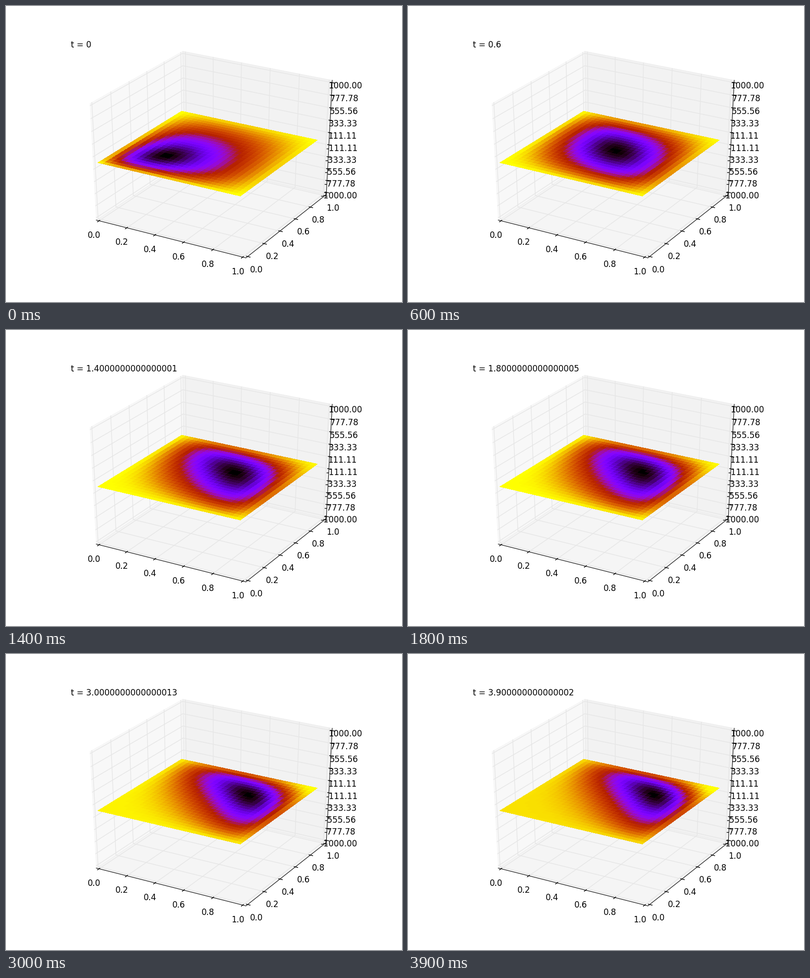
Animation of 800x600 px, one loop 4 s. Source, as a matplotlib script:

```python
import numpy as np
import matplotlib.pyplot as plt
from matplotlib.animation import FuncAnimation
from matplotlib.collections import LineCollection, PolyCollection

W, H = 800, 600
FRAMES, INTERVAL = 40, 100
NODES = 30
LO, HI = -1 / 48, 1 + 1 / 48      # panes reach a little past the unit cube
TICK_OUT, TICK_IN = 0.1 / 12, 0.2 / 12
LABEL_GAP = 0.7 / 12
BASELINE = 14.7                   # label anchor to text baseline

plt.rcParams["font.family"] = "DejaVu Sans"
plt.rcParams["font.size"] = 12
plt.rcParams["text.kerning_factor"] = 6

fig = plt.figure(figsize=(W / 100, H / 100), dpi=100, facecolor="white")
ax = fig.add_axes([0, 0, 1, 1])
ax.set_xlim(0, W)
ax.set_ylim(H, 0)
ax.axis("off")


def project(p):
    """Perspective view of the unit cube (elev 30, azim -60) in pixels."""
    q = np.asarray(p, float) - 0.5
    c, s = np.cos(np.pi / 6), 0.5
    right = q @ [c, s, 0]
    up = q @ [-s * s, s * c, c]
    depth = 10 - q @ [s * c, -c * c, s]
    x = 100 + 620 * (right / depth + 0.095) / 0.185
    y = 540 - 480 * (up / depth + 0.095) / 0.185
    return np.stack([x, y], axis=-1)


def put(axis, value, rest):
    """Point with the given axis coordinate; rest fills the other two."""
    p = list(rest)
    p.insert(axis, value)
    return p


def draw_panes():
    panes = [
        ([(LO, LO, LO), (LO, HI, LO), (LO, HI, HI), (LO, LO, HI)], 0.95),
        ([(LO, HI, LO), (HI, HI, LO), (HI, HI, HI), (LO, HI, HI)], 0.9),
        ([(LO, LO, LO), (HI, LO, LO), (HI, HI, LO), (LO, HI, LO)], 0.925),
    ]
    for corners, grey in panes:
        color = (grey, grey, grey, 0.5)
        ax.add_collection(PolyCollection([project(corners)], facecolors=[color],
                                         edgecolors=[color], linewidths=1))


def draw_axis(axis, ticks, labels, edge, back, tick_dir, sign):
    """edge: fixed coordinates of the axis line; back: of the rear corner."""
    front = [HI if b == LO else LO for b in back]
    grid = [project([put(axis, t, (front[0], back[1])),
                     put(axis, t, back),
                     put(axis, t, (back[0], front[1]))]) for t in ticks]
    ax.add_collection(LineCollection(grid, colors="0.9", linewidths=1))

    line = project([put(axis, LO, edge), put(axis, HI, edge)])
    ax.plot(*line.T, color="black", lw=0.75)

    away = [e + np.sign(e - 0.5) * LABEL_GAP for e in edge]
    for t, label in zip(ticks, labels):
        a, b = put(axis, t, edge), put(axis, t, edge)
        a[tick_dir] += sign * TICK_OUT
        b[tick_dir] -= sign * TICK_IN
        ax.plot(*project([a, b]).T, color="black", lw=1)
        x, y = project(put(axis, t, away))
        ax.text(x, y + BASELINE, label, ha="center", va="baseline")


def field(x, y, t):
    """Hump that drifts along the diagonal and turns over near (1, 1)."""
    r = t / (t + 0.65)
    peak = 0.295 + 0.445 * r
    width = 0.38 - 0.257 * r
    q = 0.6 * np.sqrt(r)
    tight = 1.7 * np.sqrt(r)

    def wall(v):
        return np.tanh(v / width) * np.tanh((1 - v) / width)

    def wall_slope(v):
        return 2 / (width * np.sinh(2 * v / width))

    # The exponent puts the maximum exactly at x = y = peak.
    slope = wall_slope(peak) - wall_slope(1 - peak)
    n = (2 * peak + 0.2) * (q / (1 - 2 * q * peak) - slope)
    s = x + y
    drift = (s + 0.2) ** n * (1 - q * s)
    return wall(x) * wall(y) * drift * np.exp(-tight * (s - 2 * peak) ** 2)


draw_panes()
fifths = np.linspace(0, 1, 6)
tenths = [f"{v:.1f}" for v in fifths]
levels = np.linspace(0, 1, 10)
heights = [f"{v:.2f}" for v in np.linspace(-1000, 1000, 10)]
draw_axis(0, fifths, tenths, (LO, LO), (HI, LO), 1, 1)
draw_axis(1, fifths, tenths, (HI, LO), (LO, LO), 0, -1)
draw_axis(2, levels, heights, (HI, HI), (LO, HI), 0, -1)

# The mesh stops one step short of 1.
nodes = np.arange(NODES) / NODES
X, Y = np.meshgrid(nodes, nodes)
P = project(np.stack([X, Y, np.full_like(X, 0.5)], axis=-1))
quads = np.stack([P[:-1, :-1], P[:-1, 1:], P[1:, 1:], P[1:, :-1]], axis=2)
surface = PolyCollection(quads.reshape(-1, 4, 2), cmap="gnuplot",
                         linewidths=0, antialiaseds=False, zorder=5)
ax.add_collection(surface)
caption = ax.text(131, 84, "", ha="left", va="baseline", zorder=6)

# The clock is summed step by step, so its rounding shows in the caption.
times = [0]
while len(times) < FRAMES:
    times.append(times[-1] + 0.1)


def update(i):
    t = times[i]
    u = -field(X, Y, t)
    mean = (u[:-1, :-1] + u[:-1, 1:] + u[1:, 1:] + u[1:, :-1]) / 4
    surface.set_array(mean.ravel())
    surface.set_clim(mean.min(), mean.max())
    caption.set_text(f"t = {t}")
    return surface, caption


anim = FuncAnimation(fig, update, frames=FRAMES, interval=INTERVAL,
                     repeat=True, repeat_delay=0, blit=False)
plt.show()
```
